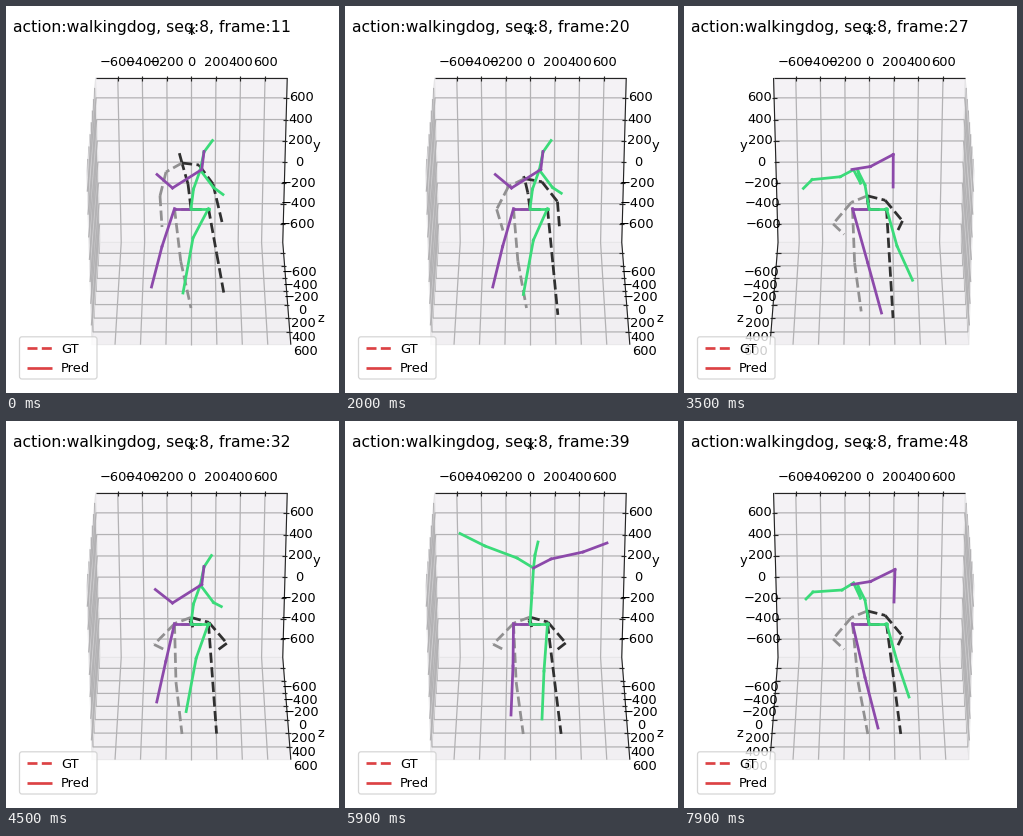
Write a matplotlib script that moves like this. It is 333 px wide and 387 px high and loops after 8 s.

```python
import numpy as np
import matplotlib.pyplot as plt
from matplotlib.animation import FuncAnimation
from matplotlib.collections import LineCollection
from matplotlib.patches import FancyBboxPatch, Polygon

W, H, DPI = 333, 387, 100
PT = 72 / DPI
CX, CY, ZOOM = 185.4, 202.9, 1952
SPAN = 1562
TICKS = range(-600, 601, 200)
BLACK, GREY = "#303030", "#919091"
GREEN, PURPLE, RED = "#3adb79", "#8c49aa", "#dc4244"
PELVIS, HIP_L, HIP_R = (185, 202.6), (168.5, 202.6), (202.5, 202.6)

plt.rcParams["font.family"] = "DejaVu Sans"
fig = plt.figure(figsize=(W / DPI, H / DPI), dpi=DPI, facecolor="white")
ax = fig.add_axes([0, 0, 1, 1])


def lerp(a, b, t):
    return np.array(a) + (np.array(b) - np.array(a)) * t


def ease(t):
    return 0.5 - 0.5 * np.cos(np.pi * np.clip(t, 0, 1))


def project(x, y, z):
    """Perspective view of the unit cube, 60 degrees above the floor's normal."""
    depth = 10 - 0.5 * y - 0.866 * z
    return CX + ZOOM * x / depth, CY - ZOOM * (0.866 * y - 0.5 * z) / depth


def bones(path, color, dashed=False):
    for a, b in zip(path[:-1], path[1:]):
        ax.plot([a[0], b[0]], [a[1], b[1]], color=color, lw=2.75 * PT,
                ls="--" if dashed else "-", zorder=3 if dashed else 4)


def text(x, y, s, px=13, ha="center", va="center", z=2.5):
    ax.text(x, y, s, fontsize=px * PT, ha=ha, va=va, color="black", zorder=z)


def segments(lines, color, px, z):
    ax.add_collection(LineCollection(lines, colors=color, linewidths=px * PT, zorder=z))


def draw_box(side, shift):
    """side is +1 when the value axes stand on the right, -1 on the left."""
    far, wall = 0.5 * side, -0.5 * side
    back = [(-.5, .5, -.5), (.5, .5, -.5), (.5, -.5, -.5), (-.5, -.5, -.5)]
    floor = [(-.5, -.5, -.5), (.5, -.5, -.5), (.5, -.5, .5), (-.5, -.5, .5)]
    flank = [(wall, .5, -.5), (wall, .5, .5), (wall, -.5, .5), (wall, -.5, -.5)]
    for corners, color in ((back, "#f4f2f5"), (floor, "#f1eff2"), (flank, "#f7f6f8")):
        ax.add_patch(Polygon([project(*c) for c in corners], fc=color,
                             ec="#e6e5e7", lw=0.6, zorder=1))

    grid, marks = [], []
    for t in TICKS:
        u, v = (t + shift) / SPAN, t / SPAN
        label = str(t).replace("-", "−")
        grid.append([project(u, .5, -.5), project(u, -.5, -.5), project(u, -.5, .5)])
        grid.append([project(far, v, -.5), project(wall, v, -.5), project(wall, v, .5)])
        grid.append([project(far, -.5, v), project(wall, -.5, v), project(wall, .5, v)])

        x, y = project(u, .5, -.5)
        marks.append([(x, y - 1.8), (x, y + 3.2)])
        text(x, 57, label)
        for at, dx, dy in (((far, v, -.5), 14.5, 0), ((far, -.5, v), 15.5, 19.3)):
            x, y = project(*at)
            marks.append([(x - 3.4 * side, y), (x + 1.8 * side, y)])
            text(x + dx * side, y + dy, label)
    segments(grid, "#b3b2b4", 1.25, 2)

    edges = [
        [project(-.5, .5, -.5), project(.5, .5, -.5)],
        [project(far, .5, -.5), project(far, -.5, -.5), project(far, -.5, .5)],
    ]
    segments(edges + marks, "#242424", 1.15, 2.2)
    text(185, 24, "x")
    text(CX + 125.5 * side, 139, "y")
    text(CX + 129.3 * side, 313, "z")


def draw_truth(m):
    """Crouch from standing, then rise a little; the feet sway slowly."""
    c = ease((m / 23) ** 0.9) - 0.0009 * max(m - 23, 0) ** 2
    neck = lerp((176, 157), (185, 197), c)
    bones([PELVIS, lerp((182, 178), (184, 200), c), neck,
           lerp((173, 146), (187, 208), c)], BLACK, True)
    bones([neck, lerp((160, 166), (169, 203), c), lerp((154, 190), (148, 224), c),
           lerp((156, 221), (161, 230), c)], GREY, True)
    bones([neck, lerp((193, 159), (203, 202), c), lerp((207, 178), (221, 223), c),
           lerp((216, 216), (212, 229), c)], BLACK, True)

    sway = 2 * np.pi * m
    foot_l = (180.5 + 4.5 * np.cos(sway / 42), 302 + 11 * ease((m - 13) / 8))
    foot_r = (213.5 + 4.5 * np.cos(sway / 33), 313 - 25 * np.exp(-m / 5))
    for hip, foot, bend, color in ((HIP_L, foot_l, 2.5, GREY), (HIP_R, foot_r, 0, BLACK)):
        bones([PELVIS, hip, lerp(hip, foot, 0.53) - (bend, 0), foot], color, True)


def draw_legs(left, right):
    bones([PELVIS, HIP_L, *left], PURPLE)
    bones([PELVIS, HIP_R, *right], GREEN)


def draw_walk(m):
    neck = (194.3, 164)
    draw_legs([(156 + 0.18 * m, 240.5), (145.5 + 0.25 * m, 281)],
              [(187 + 0.15 * m, 232 + 0.25 * m), (177 + 0.15 * m, 287 + 0.17 * m)])
    bones([PELVIS, (187.5, 183), neck, (198, 146), (206.5 - 0.05 * m, 134.5)], GREEN)
    bones([neck, (207.5, 181.5), (217 - 0.08 * m, 188.5 - 0.14 * m)], GREEN)
    bones([(198, 145.5), (195.8, 163.5), (166.5, 182), (151 - 0.08 * m, 168.5)], PURPLE)


def draw_lean(m):
    d = (m - 13) / 24
    draw_legs([(184 - 3 * d, 256.5), (198 - 4 * d, 307)],
              [(213, 240), (229 - 4 * d, 274 + 2 * d)])
    shoulder = (169.5, 164 - 2 * d)
    bones([PELVIS, (181, 179), (174, 165), (176.5, 177), shoulder], GREEN)
    bones([shoulder, (156 + 2 * d, 171 - 2 * d), (128 + d, 174 - 3 * d),
           (119 + 3 * d, 183 - 5 * d)], GREEN)
    bones([(168, 163.5), (186.5, 160.5), (209 + 2 * d, 148.5), (209 + d, 181)], PURPLE)


def draw_spread():
    neck = (188.5, 147)
    draw_legs([(168, 245), (166, 294)], [(199, 250), (197, 298)])
    bones([PELVIS, (187, 172), neck, (190, 134), (193, 121)], GREEN)
    bones([neck, (172, 137), (140, 125), (115, 112.5)], GREEN)
    bones([neck, (206, 138), (238, 131), (262, 122)], PURPLE)


def draw_legend():
    ax.add_patch(FancyBboxPatch((16, 333.3), 72.5, 37.2, boxstyle="round,pad=2.5",
                                fc="white", ec="#cccccc", alpha=0.8, lw=0.9, zorder=5))
    for y, name, style in ((342, "GT", "--"), (361.5, "Pred", "-")):
        ax.plot([20.5, 45.8], [y, y], color=RED, lw=2.7 * PT, ls=style, zorder=6,
                solid_capstyle="butt")
        text(55, y, name, ha="left", va="center_baseline", z=6)


def draw(i):
    n = int(11.5 + 0.47 * i)
    m = n - 11
    ax.clear()
    ax.set(xlim=(0, W), ylim=(H, 0))
    ax.axis("off")

    flipped = 27 <= n <= 29 or n >= 46
    draw_box(-1 if flipped else 1, -10 if 23 <= n <= 26 else 0)
    draw_truth(m)
    if 23 <= n <= 28 or n >= 46:
        draw_lean(m)
    elif 37 <= n <= 40:
        draw_spread()
    else:
        draw_walk(m)
    draw_legend()
    text(145.8, 26, f"action:walkingdog, seq:8, frame:{n}", 15.6, va="baseline")
    return []


anim = FuncAnimation(fig, draw, frames=80, interval=100, init_func=lambda: [],
                     repeat=True, repeat_delay=0, blit=False)
plt.show()
```
